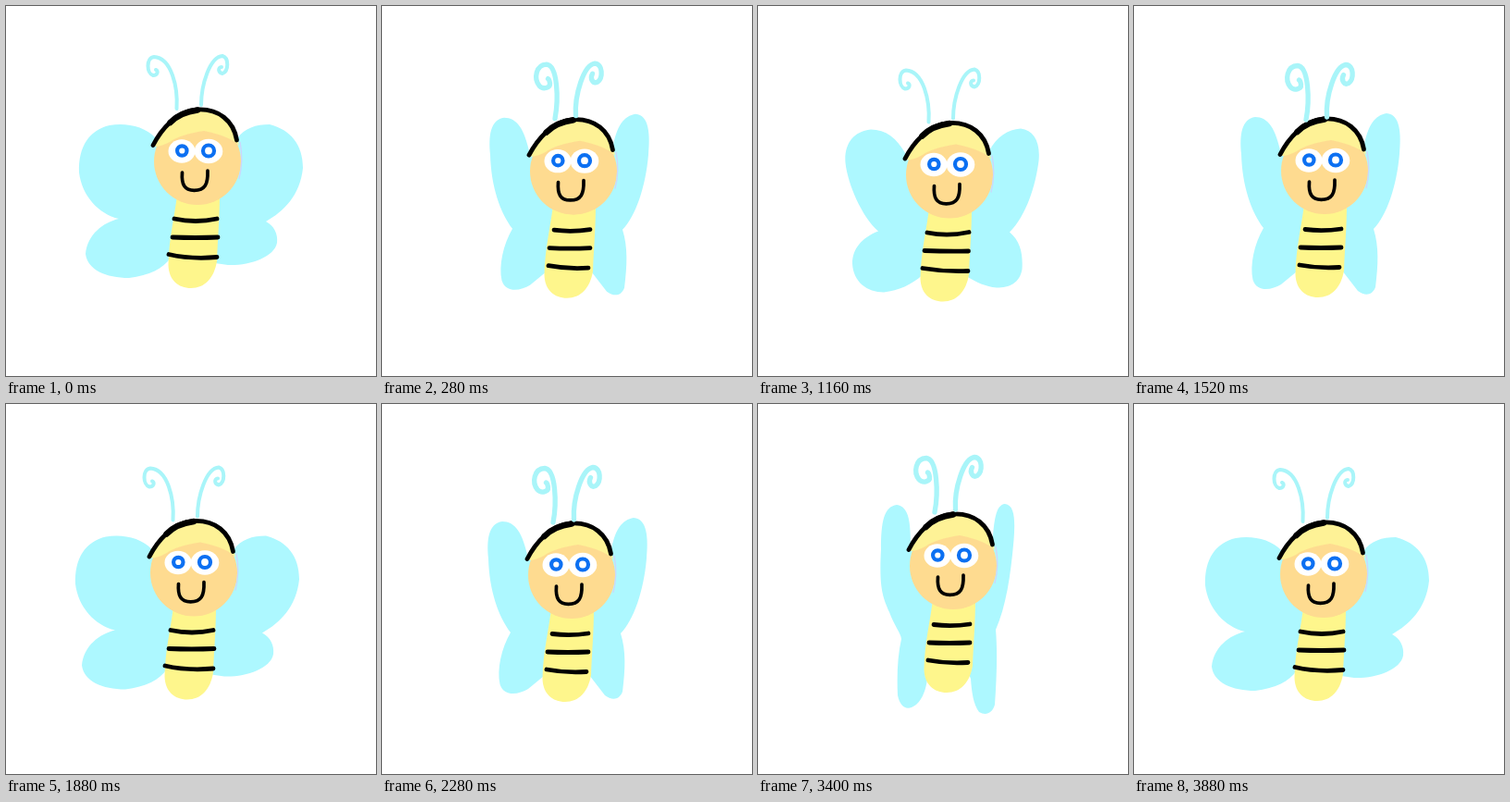
Write an HTML page that moves like this. It is 400 by 400 pixels and loops after 4000 ms.

```html
<!DOCTYPE html>
<html lang="en">
<head>
<meta charset="utf-8">
<title>Flapping bee</title>
<style>
  html, body { margin: 0; width: 100%; height: 100%; overflow: hidden; background: #fff; }
  svg { display: block; width: 100vw; height: 100vh; }
  .line { fill: none; stroke: #000; stroke-linecap: round; stroke-linejoin: round; }
  #feelers { fill: none; stroke: #a9f5f9; stroke-linecap: round; stroke-linejoin: round; }
  #wings { fill: #adf8ff; }
</style>
</head>
<body>
<svg viewBox="0 0 400 400">
  <g id="bee">
    <path id="wings"/>
    <path fill="#fef68c" d="M185 203C183 225 176 250 175.500 280C176 296 186 305 200 305C215 305 225 294 228 276C229 250 231 230 231 203Z"/>
    <path id="stripes" class="line" stroke-width="4.8"/>
    <ellipse cx="207" cy="168" rx="47" ry="47" fill="#fedb90"/>
    <path d="M253 147Q257 167 252 187" fill="none" stroke="#ccd6fa" stroke-width="1.3"/>
    <path fill="#fef296" d="M160 152C168 133 184 112 207 111C231 111 248 126 252 151Q243 141 214 135Q188 139 177 147Q168 152 160 152Z"/>
    <path class="line" stroke-width="4.8" d="M159 150.500C167 135 184 113 207 112C230 111 246 124 249.500 145"/>
    <path class="line" stroke-width="6.500" d="M177.500 126Q188 115 207 112.500"/>
    <path id="feelers"/>
    <g fill="#fff">
      <ellipse cx="190" cy="157" rx="14.500" ry="12.700"/>
      <ellipse cx="219" cy="157" rx="15.300" ry="13.200"/>
      <g stroke="#0c70f2" stroke-width="4.200">
        <circle cx="190.300" cy="156.500" r="5.200"/>
        <circle cx="219" cy="156.500" r="6"/>
      </g>
    </g>
    <path class="line" stroke-width="3.700" d="M190.500 180C189.500 193 193 199.300 203.500 199.300C215 199.300 218.500 193 218 178"/>
  </g>
</svg>
<script>
  const wings = {
    open: [
      'M162 143C150 130 130 126 112 129C90 134 78 152 79 180C82 205 100 225 122 230C105 234 88 247 86 268C88 285 108 294 133 294C155 291 170 284 178 272',
      'M250 143C258 132 270 128 285 128C308 134 321 150 321 175C318 205 300 222 281 233C290 238 294 246 293 256C290 272 262 281 240 280L226 278'
    ],
    half: [
      'M160 146C150 128 138 119 122 119C102 121 93 136 94.500 155C97 178 112 213 130 229C112 236 102 248 102 264C103 284 118 295 136 295C152 293 166 287 178 276',
      'M250 142C258 127 270 119 284 118C298 120 305.500 132 303.500 153C300 180 290 212 272 230C284 240 286.500 254 285.500 270C283 285 272 290 258 290C246 289 236 284 226 278'
    ],
    high: [
      'M160 150C154 122 146 110 132 110C117 112 115 130 117 150C118 185 128 213 141 230C131 247 126 270 129.500 286C134 300 150 297 160 291L177 277',
      'M249 146C253 118 262 108 274 106C289 107 290 128 288 150C285 185 274 217 260 231C266 250 265 270 262 294C258 304 250 303 243 298L226 276'
    ],
    up: [
      'M161 150C161 122 160 104 146 102C132 104 129 120 129 150C127 190 130 200 138 218C143 232 150 240 151 247C147 265 146 285 147 308C150 322 158 325 167 318C174 312 178 300 179 290',
      'M249 150C251 118 253 102 263 101C274 102 274 120 272.500 140C269 180 264 212 253 237C255 260 254 290 252 318C249 328 242 330 235 326C229 318 227 305 226 290'
    ]
  };

  const feelers = {
    wide: {
      width: 4,
      d: 'M184.500 111C186 88 179 56 160 55C151 56 152 73 159 75C164 75 165 70 162 69M211 107C211 86 220 55 234 54C241 56 241 70 234 73C229 72 229 66 233 66'
    },
    narrow: {
      width: 5.300,
      d: 'M187 113C191 92 190 56 178 54.500C166 55 164 70 170 77.500C174 82 182 80 181.500 75Q181 71 179.500 70M209.500 110C208 88 218 55 230 53.500C239 54 239 69 233 73.500C228 76 224.500 70 227.500 64.500'
    }
  };

  const stripes = {
    long: 'M182 230Q205 235 228 230M180 250Q205 251 229 250M176 268.500Q200 274 228 271.500',
    mid: 'M183 230.500Q205 235 228 230M180 250Q205 251 227.500 250.500M178 269Q202 273 227 272',
    short: 'M186 231.500Q205 234 225 231M181 251Q203 252 225 251M180 270Q201 274 223 272.500'
  };

  // One flap: wings, feelers, stripes, feeler lift
  const flap = [
    ['open', 'wide', 'long', 0],
    ['half', 'wide', 'mid', 0],
    ['high', 'narrow', 'short', -2],
    ['up', 'narrow', 'short', -3],
    ['high', 'narrow', 'short', 0],
    ['half', 'wide', 'mid', 0],
    ['half', 'narrow', 'mid', 0],
    ['open', 'wide', 'long', 0]
  ];

  // Drift keys: step, offset
  const driftX = [[0, 0], [9, 0], [12, -1], [15, -4], [18, -2], [22, 3.5], [24, 5], [27, 4], [31, -2]];
  const driftY = [[0, 0], [3, 16], [5, 24], [8, 16], [12, 10], [16, 16], [18, 17], [19, 17], [22, 10], [25, 7], [27, 7], [31, 16]];

  function at(keys, step) {
    const i = keys.findIndex(key => key[0] >= step);
    if (i === 0) return keys[0][1];
    const [s0, v0] = keys[i - 1];
    const [s1, v1] = keys[i];
    return v0 + (v1 - v0) * (step - s0) / (s1 - s0);
  }

  const el = id => document.getElementById(id);
  const set = (id, attrs) => {
    for (const name in attrs) el(id).setAttribute(name, attrs[name]);
  };

  function draw(step) {
    const [wing, feeler, stripe, lift] = flap[step % 8];
    const [left, right] = wings[wing];
    set('bee', { transform: `translate(${at(driftX, step)} ${at(driftY, step)})` });
    set('wings', { d: `${left}L205 240L205 180Z${right}L205 240L205 180Z` });
    set('feelers', {
      d: feelers[feeler].d,
      'stroke-width': feelers[feeler].width,
      transform: `translate(0 ${lift})`
    });
    set('stripes', { d: stripes[stripe] });
  }

  // Each second holds the open pose for 160 ms, then seven poses of 120 ms
  function stepAt(time) {
    const t = time % 4000;
    const beat = t % 1000;
    const pose = beat < 160 ? 0 : 1 + Math.floor((beat - 160) / 120);
    return Math.floor(t / 1000) * 8 + pose;
  }

  const start = performance.now();
  let shown = -1;
  function tick() {
    const step = stepAt(performance.now() - start);
    if (step !== shown) draw(shown = step);
    requestAnimationFrame(tick);
  }
  tick();
</script>
</body>
</html>
```
